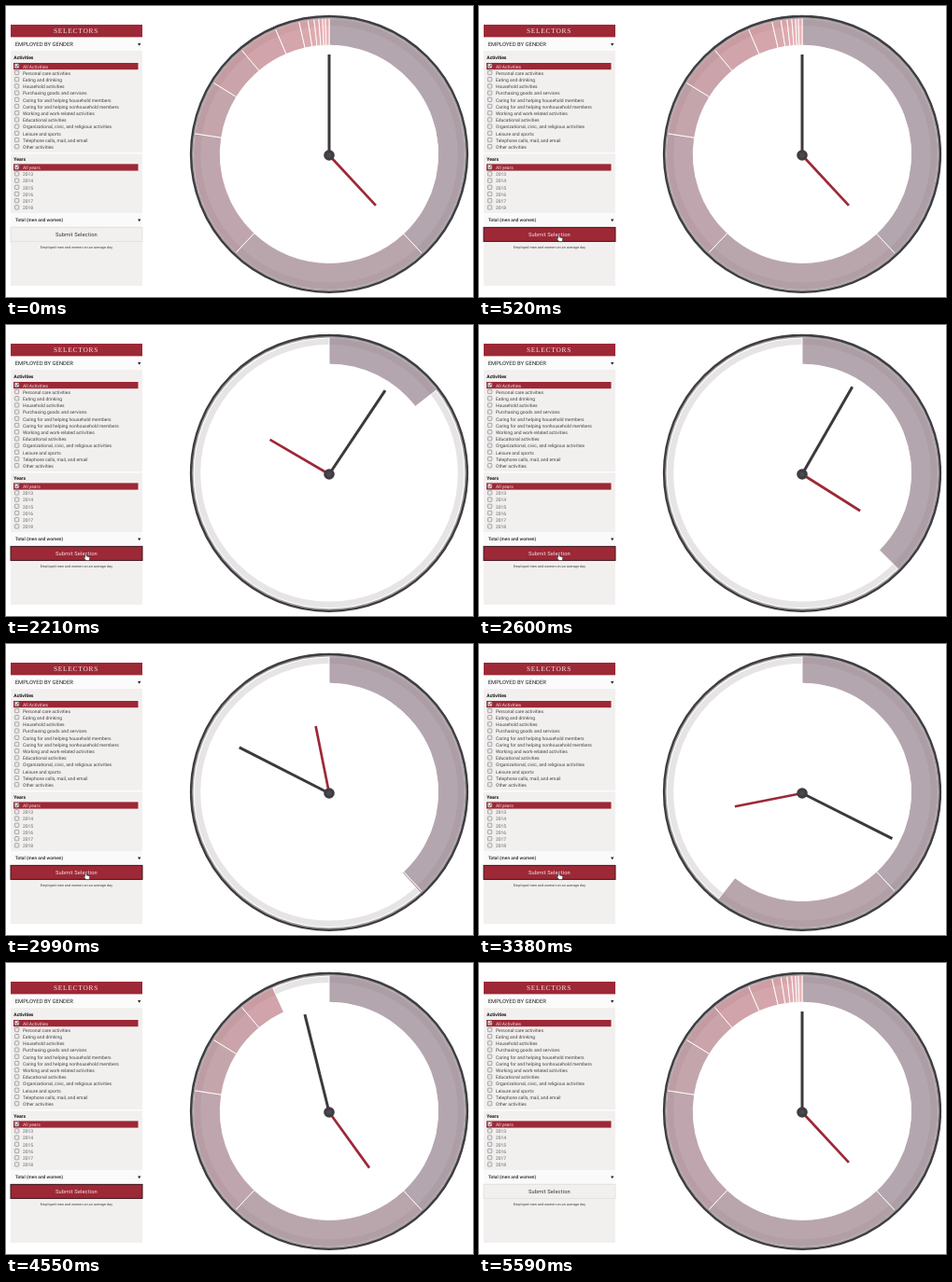
Write an HTML page that moves like this. It is 500 by 312 pixels and loops after 6110 ms.

```html
<!DOCTYPE html>
<html lang="en">
<head>
<meta charset="utf-8">
<title>Time use clock</title>
<style>
  html, body { margin: 0; width: 100%; height: 100%; overflow: hidden; background: #fff; }
  svg { display: block; width: 100vw; height: 100vh; }
  text { font-family: Roboto, sans-serif; fill: #444042; text-rendering: geometricPrecision; }
</style>
</head>
<body>
<svg id="stage" viewBox="0 0 500 312"></svg>
<script>
const LOOP = 6110, STEP = 130;
const CLICK = 1560;
const SPIN = { start: 1555, length: 3440 };
const SWEEP = { start: 1650, rate: 0.1143 };
const CX = 346, CY = 158.8, PIVOT = 160, R_IN = 116.7, R_OUT = 146;
const RED = '#9d2836', DARK = '#3f3d41';
const EDGES = [0, 137, 223.4, 278.7, 301.7, 320, 336.8, 347.2, 351, 353.6, 355.6, 357.2, 358.4, 360];
const ACTIVITIES = ['All Activities', 'Personal care activities', 'Eating and drinking',
  'Household activities', 'Purchasing goods and services', 'Caring for and helping household members',
  'Caring for and helping nonhousehold members', 'Working and work-related activities',
  'Educational activities', 'Organizational, civic, and religious activities',
  'Leisure and sports', 'Telephone calls, mail, and email', 'Other activities'];
const YEARS = ['All years', '2013', '2014', '2015', '2016', '2017', '2018'];

const stage = document.getElementById('stage');
const clamp = v => Math.min(1, Math.max(0, v));
const mix = (a, b, k) => `rgb(${a.map((v, i) => Math.round(v + (b[i] - v) * k))})`;

function add(tag, attrs, content) {
  const el = document.createElementNS('http://www.w3.org/2000/svg', tag);
  for (const name in attrs) el.setAttribute(name, attrs[name]);
  if (content) el.textContent = content;
  return stage.appendChild(el);
}
const rect = (x, y, width, height, fill, more) => add('rect', { x, y, width, height, fill, ...more });
const label = (x, y, size, text, more) => add('text', { x, y, 'font-size': size, ...more }, text);
const heading = (y, text) => label(8.3, y, 5, text, { 'font-weight': 700, style: 'fill:#111' });
const ring = (r, stroke, width) =>
  add('circle', { cx: CX, cy: CY, r, fill: 'none', stroke, 'stroke-width': width });
const arrow = y => add('path', { d: `M141 ${y}h3.4l-1.7 2.8z`, fill: '#222' });

function checklist(items, top, color) {
  items.forEach((text, i) => {
    const y = top + i * 7.2;
    if (!i) rect(8, y, 133.5, 7.2, RED);
    rect(9.4, y + 1.1, 4.4, 4.4, i ? '#e9e7e7' : '#f6eeee', { rx: 0.8, stroke: '#8d898b', 'stroke-width': 0.7 });
    if (!i) add('path', { d: `M10.4 ${y + 3.2}l1 1.2 1.7-2.4`, fill: 'none', stroke: '#333', 'stroke-width': 0.8 });
    label(18, y + 5.6, 4.95, text, { style: `fill:${i ? color : '#f3dfe1'}` });
  });
}

// Selector panel
rect(5, 20, 141, 280, '#f2f0ef');
rect(5, 20, 141, 13.6, RED);
label(75, 29.2, 7.4, 'SELECTORS', {
  'text-anchor': 'middle', 'letter-spacing': 0.75, style: 'font-family:"Liberation Serif",serif;fill:#f5e4e5'
});
rect(5, 33.6, 141, 14.4, '#fcfbfb');
label(9.7, 43.2, 5.9, 'EMPLOYED BY GENDER', { style: 'fill:#222' });
arrow(40);
heading(57.3, 'Activities');
checklist(ACTIVITIES, 61, '#444042');
rect(5, 157.2, 141, 1.2, '#fff');
heading(165.5, 'Years');
checklist(YEARS, 169.4, '#666264');
rect(5, 222, 141, 14.5, '#fbfafa');
label(10, 231.4, 4.85, 'Total (men and women)', { 'font-weight': 500, style: 'fill:#222' });
arrow(228.4);
const button = rect(5, 237.4, 141, 15, '#f2f0ef', { 'stroke-width': 1 });
const submit = label(75.4, 247, 5.75, 'Submit Selection', { 'text-anchor': 'middle', 'letter-spacing': 0.1 });
label(75.4, 260.3, 3.8, 'Employed men and women on an average day', { 'text-anchor': 'middle' });

const cursor = add('path', {
  d: 'M84.6 249.3v-3.5q.8-1 1.5 0v2.2q1-.5 1.4.3 1-.3 1.3.5 1-.1 1 .8l-.5 3h-3.6l-2.4-3q.3-1 1.3-.3z',
  fill: '#fff', stroke: '#222', 'stroke-width': 0.6
});

// Clock face
ring(141, '#e7e4e5', 6.5);
const slices = EDGES.slice(1).map((_, i) => add('path', {
  fill: i < 5 ? mix([148, 128, 140], [188, 126, 134], i / 5) : mix([188, 126, 134], [230, 150, 155], (i - 5) / 7),
  'fill-opacity': 0.7, stroke: '#fff', 'stroke-width': 0.9
}));
ring(146.1, '#a5a2a6', 1.4);
ring(147.9, DARK, 2.5);
const hand = (length, stroke, width) =>
  add('line', { x1: CX, y1: PIVOT, x2: CX, y2: PIVOT - length, stroke, 'stroke-width': width });
const hourHand = hand(73.5, RED, 2.7);
const minuteHand = hand(108, '#3d383b', 3);
add('circle', { cx: CX, cy: PIVOT, r: 5.8, fill: DARK });
add('circle', { cx: CX, cy: PIVOT, r: 2.6, fill: '#4b494d' });

// Standard "ease" curve: cubic-bezier(.25, .1, .25, 1)
function ease(x) {
  const bez = (a, b, u) => 3 * a * u * (1 - u) ** 2 + 3 * b * u * u * (1 - u) + u ** 3;
  let lo = 0, hi = 1;
  for (let i = 0; i < 24; i++) {
    const mid = (lo + hi) / 2;
    if (bez(0.25, 0.25, mid) < x) lo = mid; else hi = mid;
  }
  return bez(0.1, 1, lo);
}
const quartInOut = u => u < 0.5 ? 8 * u ** 4 : 1 - 8 * (1 - u) ** 4;

function point(r, deg) {
  const a = deg * Math.PI / 180;
  return `${(CX + r * Math.sin(a)).toFixed(2)} ${(CY - r * Math.cos(a)).toFixed(2)}`;
}
function wedge(from, to) {
  const big = to - from > 180 ? 1 : 0;
  return `M${point(R_OUT, from)}A${R_OUT} ${R_OUT} 0 ${big} 1 ${point(R_OUT, to)}` +
    `L${point(R_IN, to)}A${R_IN} ${R_IN} 0 ${big} 0 ${point(R_IN, from)}Z`;
}

function draw(time) {
  const t = Math.min(Math.floor(time / STEP) * STEP, 5590);

  const spin = ease(clamp((t - SPIN.start) / SPIN.length));
  minuteHand.setAttribute('transform', `rotate(${1440 * spin} ${CX} ${PIVOT})`);
  hourHand.setAttribute('transform', `rotate(${137.2 - 720 * spin} ${CX} ${PIVOT})`);

  const swept = t < CLICK ? 360 : (t - SWEEP.start) * SWEEP.rate;
  slices.forEach((slice, i) => {
    const from = EDGES[i], span = EDGES[i + 1] - from;
    const part = quartInOut(clamp((swept - from) / span));
    slice.setAttribute('d', part > 0 ? wedge(from, from + span * part) : '');
  });

  const hover = clamp(t / 520) * clamp((5590 - t) / 260);
  button.setAttribute('fill', mix([242, 240, 239], [157, 40, 54], hover));
  button.setAttribute('stroke', mix([228, 225, 225], [62, 20, 28], hover));
  submit.style.fill = mix([58, 54, 56], [245, 222, 224], hover);
  cursor.style.display = t >= 130 && t < 3510 ? '' : 'none';
}

const begin = performance.now();
function tick() {
  draw((performance.now() - begin) % LOOP);
  requestAnimationFrame(tick);
}
tick();
</script>
</body>
</html>
```
